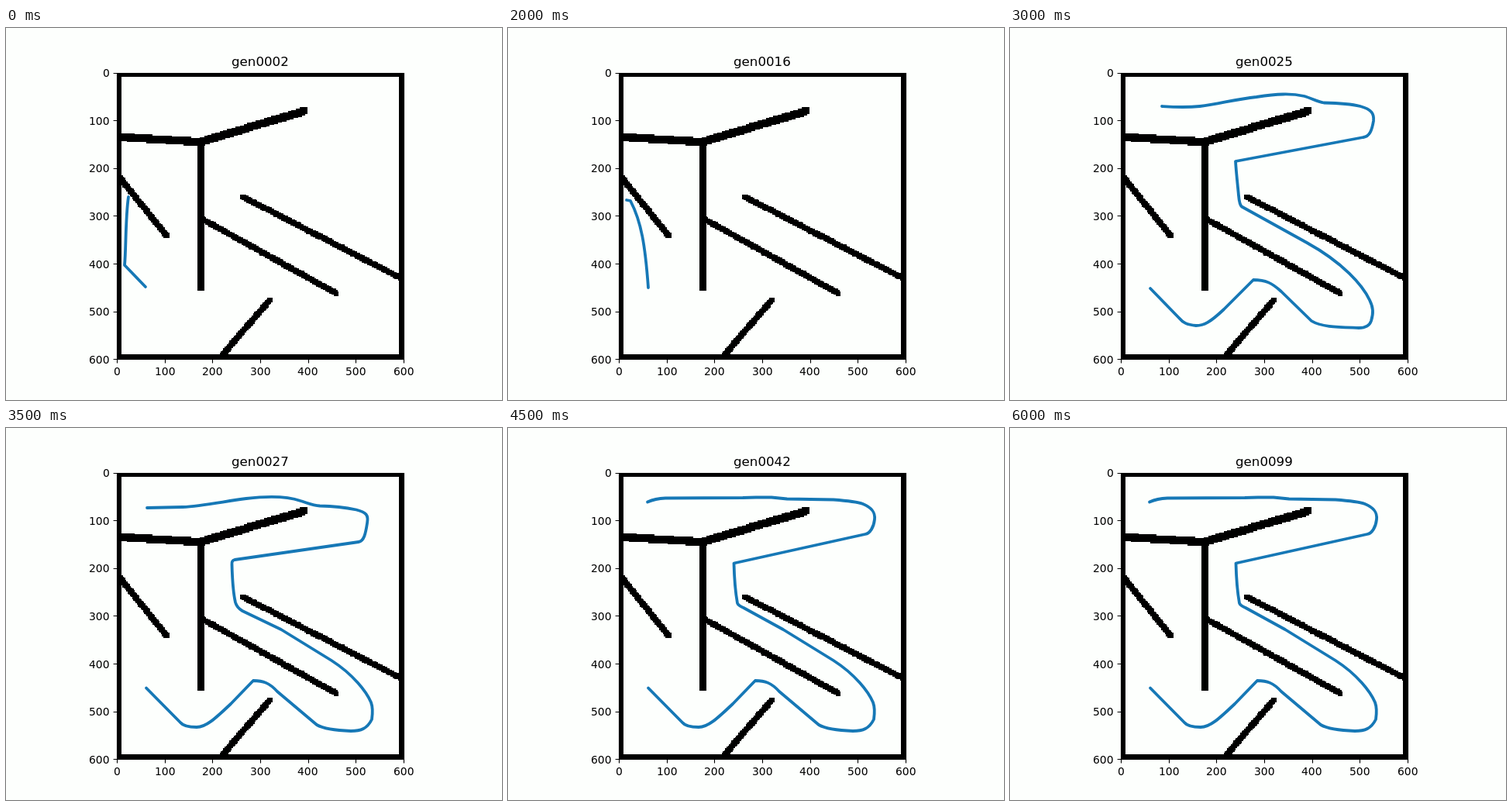
An HTML page with a canvas that plays this animation: 640 by 480 pixels, repeating every 6500 ms.

```html
<!DOCTYPE html>
<html lang="en">
<head>
<meta charset="utf-8">
<title>Path search</title>
<style>
  html, body { margin: 0; width: 100%; height: 100%; overflow: hidden; background: #fdfffd; }
  canvas { display: block; }
</style>
</head>
<body>
<canvas id="stage" width="640" height="480"></canvas>
<script>
const ctx = document.getElementById('stage').getContext('2d');
const STEP = 500;
const LEFT = 143.2, TOP = 57.6, SIZE = 369.6;
const CELL = SIZE / 240;
const FONT = '"DejaVu Sans", sans-serif';

// Walls: x1, y1, x2, y2, half width of the square brush
const walls = [
  [149, 140.5, 251, 147, 5],
  [251, 147, 384.4, 107.3, 4.5],
  [251.5, 147, 251.5, 334.6, 4.5],
  [147.5, 193.5, 207, 268, 3.2],
  [252, 245.7, 426, 342.3, 3.2],
  [305.5, 217.7, 509, 322.5, 3.2],
  [279, 422, 340.5, 351, 3.2]
];

// Upper halves of the long route
const upperEarly = 'M196 101C211 102 225 103 245 101C270 98 290 92 318 89C345 85 362 84 380 88C390 91 396 95 405 96.5C430 97 440 98 452 101C467 105 470 111 469 120C467 132 464 140 456 141L291 172C292 188 294 205 295 216Q296 228 299 230.5';
const upperMiddle = 'M182 103L228 102C252 101 280 95 310 91C335 88 360 87 380 94C390 97 396 100 405 100.5C430 101 440 103 452 105.5C465 109 468 112 466 123C464 136 462 146 455 147L295 170Q291 171 291.5 176C292 195 293 212 296 225Q298 232 305 236';
const upperWide = 'M188 95L215 94L291 92L335 91L355 92.5L420 93C440 94 450 96 458 98C470 103 475 110 474 120C472 135 467 145 460 145L292 173.5C293 195 294 213 296 223Q297 226 305 230';
const upperFinal = 'M180 95.5Q190 91 203 90.5L303 90L320 89.5L340 89.5L360 91.5L420 92.5C440 94 450 95 458 98C470 103 474 109 473 118C472 128 467 136 461 137L291.5 174.5C292 195 294 215 296 226Q297 229 304 232';

// Lower halves of the long route
const lowerEarly = 'L383 277C430 303 455 332 464 351C469 361 469 368 466 378Q463 387 450 387C425 386 402 386 389 378L350 340C338 329 330 325 314 325L276 363C258 380 250 384 240 384C228 383 223 380 218 374L181 336';
const lowerMiddle = 'L383 279C425 302 450 328 460 348C465 357 466 364 464 374Q461 384 450 384C425 383 405 382 392 375L356 345C343 334 333 330 321 322Q315 317 311 321L273 361C258 376 253 381 245 381C232 381 223 378 215 373L181 335.5';
const lowerWide = 'L355 260L420 300C448 318 465 340 471 354C474 362 473 369 472 376C466 388 458 391 445 391C420 390 408 387 401 383L350 340C340 329 332 326 319 326L290 356C270 375 258 386 246 386C236 386 229 385 225 380L181 335.5';

const poses = [
  [2, 'M158 218C154 245 155 285 153 306L180 334'],
  [4, 'M157 218C154 245 155 280 153 300L181 335'],
  [6, 'M154 217Q157 219 161 229C170 247 176 265 178 290L181 335'],
  [11, 'M155 218L161 229C170 247 176 267 178 295L181 335'],
  [16, 'M153 222L158 223C172 250 177 280 181 335'],
  [22, upperEarly + lowerEarly],
  [25, upperEarly + lowerEarly],
  [27, upperMiddle + lowerWide],
  [30, upperMiddle + lowerMiddle],
  [42, upperFinal + lowerWide],
  [57, upperWide + lowerWide],
  [78, upperFinal + lowerWide],
  [99, upperFinal + lowerWide]
].map(([generation, d]) => ({ generation, path: new Path2D(d) }));

// Text starts on a whole pixel; anchor 0 is left, 0.5 centre, 1 right
function text(string, x, y, size, anchor) {
  ctx.font = `${size}px ${FONT}`;
  ctx.fillText(string, Math.round(x - ctx.measureText(string).width * anchor), y);
}

function drawWall([x1, y1, x2, y2, half]) {
  const snap = v => Math.round(v / CELL) * CELL;
  const count = Math.ceil(Math.hypot(x2 - x1, y2 - y1));
  for (let i = 0; i <= count; i++) {
    const x = x1 + snap((x2 - x1) * i / count);
    const y = y1 + snap((y2 - y1) * i / count);
    const left = Math.round(x - half), top = Math.round(y - half);
    ctx.fillRect(left, top, Math.round(x + half) - left, Math.round(y + half) - top);
  }
}

function drawAxes() {
  ctx.fillRect(143, 58, 6, 370);
  ctx.fillRect(507, 58, 7, 370);
  ctx.fillRect(143, 58, 371, 5);
  ctx.fillRect(143, 421, 371, 7);
  ctx.strokeStyle = '#000';
  ctx.lineWidth = 1.11;
  ctx.strokeRect(143.5, 58.5, 370, 369);
  ctx.beginPath();
  for (let i = 0; i <= 6; i++) {
    const x = LEFT + i * SIZE / 6, y = TOP + i * SIZE / 6;
    const tickX = Math.round(x) + 0.5, tickY = Math.round(y) + 0.5;
    ctx.moveTo(tickX, 427.5);
    ctx.lineTo(tickX, 432.4);
    ctx.moveTo(143.5, tickY);
    ctx.lineTo(138.6, tickY);
    text(String(i * 100), x, 448, 13.89, 0.5);
    text(String(i * 100), 133.5, Math.floor(y) + 6, 13.89, 1);
  }
  ctx.stroke();
}

function draw(now) {
  const { generation, path } = poses[Math.floor(now / STEP) % poses.length];
  ctx.fillStyle = '#fdfffd';
  ctx.fillRect(0, 0, 640, 480);
  ctx.fillStyle = '#000';
  walls.forEach(drawWall);
  ctx.lineCap = 'butt';
  ctx.lineJoin = 'miter';
  drawAxes();
  text('gen' + String(generation).padStart(4, '0'), 328, 49, 16.67, 0.5);
  ctx.strokeStyle = '#1678b6';
  ctx.lineWidth = 3.8;
  ctx.lineCap = ctx.lineJoin = 'round';
  ctx.stroke(path);
}

let start;
function tick(now) {
  start ??= now;
  draw(now - start);
  requestAnimationFrame(tick);
}
draw(0);
requestAnimationFrame(tick);
</script>
</body>
</html>
```
